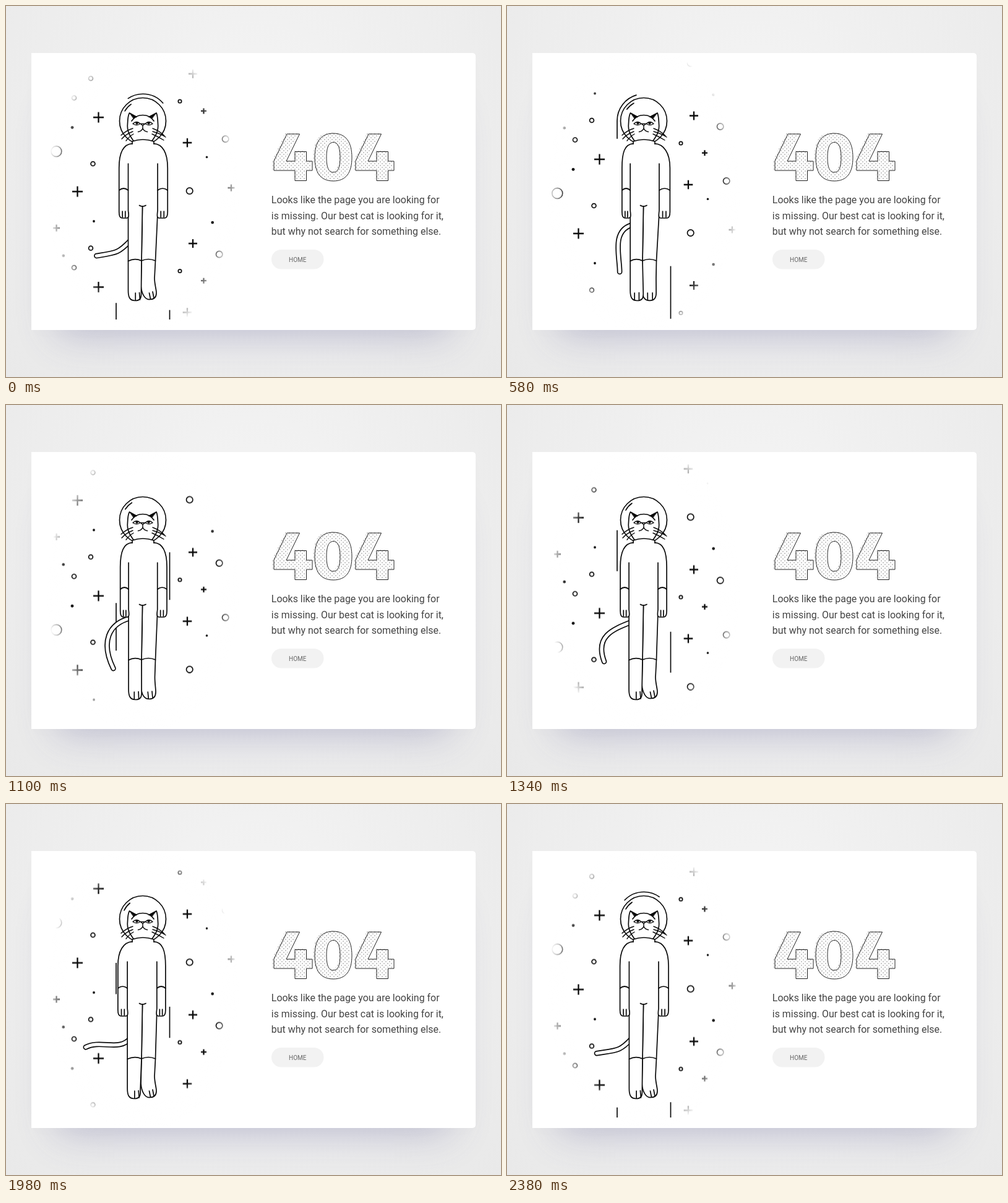
An HTML page for the animation above (2400 ms loop, 800x600 px).

```html
<!DOCTYPE html>
<html lang="en">
<head>
<meta charset="utf-8">
<title>404</title>
<style>
html, body { margin: 0; width: 100%; height: 100%; overflow: hidden; }
body { position: relative; background: radial-gradient(ellipse at 50% 30%, #f4f4f4, #e9e9e9); }
.card {
  position: absolute; left: 41px; top: 75.5px; width: 718px; height: 448.5px;
  border-radius: 5px; background: #fff;
  box-shadow: 0 50px 60px -42px rgba(75, 75, 140, .3), 0 6px 30px rgba(0, 0, 0, .012);
}
svg { position: absolute; left: 0; top: 0; }
.copy { font: 15.94px Roboto, sans-serif; fill: #444; }
.button { font: 10px Roboto, sans-serif; fill: #666; }
.ink { fill: none; stroke: #0a0a0a; stroke-width: 1.7; stroke-linecap: round; stroke-linejoin: round; }
.ink .solid { fill: #fff; }
.ink .dark { fill: #0a0a0a; stroke-width: .6; }
.ink .blank { fill: #fff; stroke: none; }
#drift { animation: drift 2400ms linear infinite; }
@keyframes drift {
  97.9%, 100% { transform: translateY(274.5px); }
}
</style>
</head>
<body>
<div class="card"></div>
<svg width="800" height="600" viewBox="0 0 800 600">
  <defs>
    <radialGradient id="fade" gradientUnits="userSpaceOnUse" cx="0" cy="0" r="1.05"
      gradientTransform="translate(221 298) scale(148 222)">
      <stop offset=".8" stop-color="#fff" stop-opacity="0"/>
      <stop offset="1" stop-color="#fff"/>
    </radialGradient>
    <pattern id="dots" width="6" height="6" patternUnits="userSpaceOnUse">
      <circle cx="1.5" cy="1.5" r=".58"/>
      <circle cx="4.5" cy="4.5" r=".58"/>
    </pattern>
    <clipPath id="frame"><rect x="41" y="76" width="360" height="448"/></clipPath>
    <path id="four" d="M433 250.5L454 207H474.5L453 251H467V235.5H485.5V251H495V266H485.5V282.5H467V266H433Z"/>
    <path id="zero" fill-rule="evenodd" d="M529 206C550 206 559 221 559 245S550 283 529 283S499 269 499 245S508 206 529 206Z
      M529 220.5C521 220.5 518 230 518 245S521 269 529 269S540 260 540 245S537 220.5 529 220.5Z"/>
    <g id="number">
      <use href="#four"/><use href="#zero"/><use href="#four" x="132"/>
    </g>
    <g id="field">
      <path stroke-width="2.3" d="M141 180h17m-8.5-8.5v17M107 300h17m-8.5-8.5v17M295 109.5h14m-7-7v14M285.7 221h14.6m-7.3-7.3v14.6
        M315 169.7h9m-4.5-4.5v9M358.5 294h11m-5.5-5.5v11M76 84.5h11m-5.5-5.5v11"/>
      <g stroke-width="1.7">
        <circle cx="137" cy="117" r="3.4"/>
        <circle cx="110" cy="148.5" r="3.5"/>
        <circle cx="140.5" cy="255" r="3.4"/>
        <circle cx="281" cy="154" r="2.7"/>
        <circle cx="354.7" cy="215" r="5.2"/>
        <circle cx="344.7" cy="127" r="5.2"/>
        <circle cx="296.7" cy="299" r="5.2"/>
        <circle cx="81.3" cy="235" r="8.5"/>
      </g>
      <g fill="#0a0a0a" stroke="none">
        <circle cx="107" cy="196.3" r="2.4"/>
        <circle cx="324.5" cy="244.3" r="1.7"/>
        <circle cx="333.7" cy="75.5" r="2.3"/>
        <circle cx="142" cy="73.5" r="1.9"/>
        <circle cx="92.7" cy="129.3" r="2.3"/>
      </g>
    </g>
    <path id="rail" d="M178 507V185.5A43.25 43.25 0 0 1 264.5 185.5V507"/>
  </defs>

  <g clip-path="url(#frame)">
    <g id="drift" fill="none" stroke="#0a0a0a">
      <use href="#field" y="-274.5"/><use href="#field"/><use href="#field" y="274.5"/>
    </g>
    <rect x="41" y="76" width="360" height="448" fill="url(#fade)"/>
  </g>
  <g fill="none" stroke="#0a0a0a" stroke-width="1.7">
    <use class="streak" href="#rail"/><use class="streak" href="#rail"/><use class="streak" href="#rail"/>
  </g>

  <g class="ink">
    <path id="tail" stroke-width="8.6"/>
    <path id="tailCore" stroke="#fff" stroke-width="5.2"/>
    <circle class="solid" cx="221" cy="186" r="37.5"/>
    <path id="shine" d="M192 170A33 33 0 0 1 202 159"/>
    <path class="blank" d="M197 193L199.5 173L221 177L243 173L245 193L236 219H206Z"/>
    <path d="M206 218C201 211 195 203 196.5 190Q197 177 199.5 173L211 179.5M236 218C241 211 247 203 245.5 190Q245 177 243 173L231 179.5"/>
    <path d="M203 186Q209 176.5 221 176.5T239 186"/>
    <path id="torso" class="blank"/>
    <path id="rightLeg" class="solid"/>
    <path id="leftLeg" class="solid"/>
    <path id="leftArm" class="solid"/>
    <path id="rightArm" class="solid"/>
    <path id="details"/>
    <path d="M204 223V219Q221 213 239 219V223M215.5 322.5Q220.5 325.5 226 322.5"/>
    <path class="dark" d="M200 173.5L211 179L206.5 182.5ZM242.5 173.5L231 179L235.5 182.5Z"/>
    <path class="solid" stroke-width="1.4" d="M205 190.5Q211 184.5 217 190.5Q211 194.5 205 190.5ZM225 190.5Q231 184.5 237 190.5Q231 194.5 225 190.5Z"/>
    <circle class="dark" cx="211.5" cy="189.4" r="1.8"/>
    <circle class="dark" cx="230.5" cy="189.4" r="1.8"/>
    <path stroke-width="1.5" d="M217.5 190.5H224.5L221 193.5ZM221 193.5V198M213.5 203.5Q218.5 203 221 198Q223.5 203 228.5 203.5"/>
    <path stroke-width="1.4" d="M205 198Q195 201 186 209M205 203Q194 207 187 215M206 207Q199 211 194 218
      M237 198Q248 202 256 210M237 203Q249 206 258 212M236 207Q245 211 255 217"/>
  </g>

  <use href="#number" x="-2.5" y="-1.5" fill="url(#dots)"/>
  <use href="#number" fill="none" stroke="#222" stroke-width="1"/>
  <g class="copy">
    <text x="428.8" y="319">Looks like the page you are looking for</text>
    <text x="428.8" y="344.5">is missing. Our best cat is looking for it,</text>
    <text x="428.8" y="370">but why not search for something else.</text>
  </g>
  <rect x="429" y="394" width="84.5" height="31.5" rx="15.75" fill="#f2f2f2"/>
  <text class="button" x="457" y="413.5">HOME</text>
</svg>
<script>
const LOOP = 2400;
const $ = id => document.getElementById(id);
const put = (id, d) => $(id).setAttribute('d', d);
const streaks = document.querySelectorAll('.streak');

// One swing per loop, peaking at the given time
const swing = (t, peak, mid, amp) => mid + amp * Math.cos((t - peak) / LOOP * 2 * Math.PI);

// Dashes follow each other up the left side, over the helmet and down
function drawStreaks(t) {
  const length = swing(t, 700, 68, 18);
  const pulse = -25 * Math.cos(t / LOOP * 4 * Math.PI);
  streaks.forEach((el, i) => {
    const age = (t + LOOP * 2 - 560 - i * LOOP / 3) % LOOP - 200;
    const back = age / 2 + pulse - length / 2;
    el.setAttribute('stroke-dasharray', `${length} 4000`);
    el.setAttribute('stroke-dashoffset', -back);
  });
}

// The wave runs from the root of the tail to its tip
function drawTail(t) {
  const root = `201 ${swing(t, -200, 363, 19)}`;
  const near = `${swing(t, -250, 174.4, 9.3)} ${swing(t, -230, 378, 26)}`;
  const far = `${swing(t, 330, 163, 24)} ${swing(t, 370, 389, 17.6)}`;
  const tip = `${swing(t, 745, 156.7, 28)} ${swing(t, 780, 413, 19.6)}`;
  const curve = `M${root}C${near} ${far} ${tip}`;
  put('tail', curve);
  put('tailCore', curve);
}

const arm = (neck, out, inn) => {
  const s = Math.sign(inn - out);
  return `M${neck} 222.7C${neck - 14 * s} 223.5 ${out} 237 ${out} 262V333C${out} 339 ${out + s} 343 ${out + 5 * s} 343` +
    `H${inn - 3 * s}C${inn + s} 343 ${inn + 1.2 * s} 340 ${inn} 331V255`;
};
const hand = (out, inn) => {
  const w = inn - out;
  return `M${out} 298Q${out + w / 2} 292 ${inn} 298M${out + w * .37} 332v9.5M${out + w * .68} 332v9.5`;
};

function drawBody(t) {
  const l = swing(t, 700, 183.4, 2.6), r = swing(t, 480, 260.2, 3.3);
  const tl = swing(t, 620, 197.6, 1.6), tr = swing(t, 500, 244.75, 1.25);
  const turn = 1 - Math.max(0, swing(t, 700, 0, 1));
  const edge = 241 + 2 * turn, shin = 241 - turn, sole = 476.5 - 2 * turn;

  put('leftArm', arm(204, l, tl));
  put('rightArm', arm(239, r, tr));
  put('torso', `M${tl} 255L204 222.5V219Q221 213 239 219V222.5L${tr} 255V336H${tl}Z`);
  put('leftLeg', `M${tl} 334V460C${tl} 470 ${tl + 2} 476.5 ${tl + 11} 476.5S${tl + 21.5} 472 ${tl + 21} 462L219 412L220.5 324`);
  put('rightLeg', `M${tr} 334L241.5 412L${shin} 440C${shin} 450 ${edge} 458 ${edge} 464` +
    `C${edge} 472 ${238 + turn} ${sole} ${230.5 + 2 * turn} ${sole}` +
    `C${222 + 3 * turn} ${476.5 - turn} 219 ${470 - 4 * turn} ${219 - turn} ${462 - 10 * turn}L219 412L220.5 324`);
  put('details', hand(l, tl) + hand(r, tr) +
    `M${tl} 412.5Q208 407 219 412Q230 407 241.5 412` +
    `M${tl + 6.7 + 5 * turn} 464v11.5M${tl + 14 + 4 * turn} 463.5l${turn} 11.5` +
    `M${227 + 4.5 * turn} 464l${2 * turn} ${11 - turn}M${235 + 2 * turn} ${464 - 2 * turn}l${2 * turn} 10.5`);
  $('shine').setAttribute('transform', `rotate(${swing(t, 650, 1, 5)} 221 186)`);
}

let start;
function draw(now) {
  start ??= now;
  const t = (now - start) % LOOP;
  drawStreaks(t);
  drawTail(t);
  drawBody(t);
  requestAnimationFrame(draw);
}
requestAnimationFrame(draw);
</script>
</body>
</html>
```
